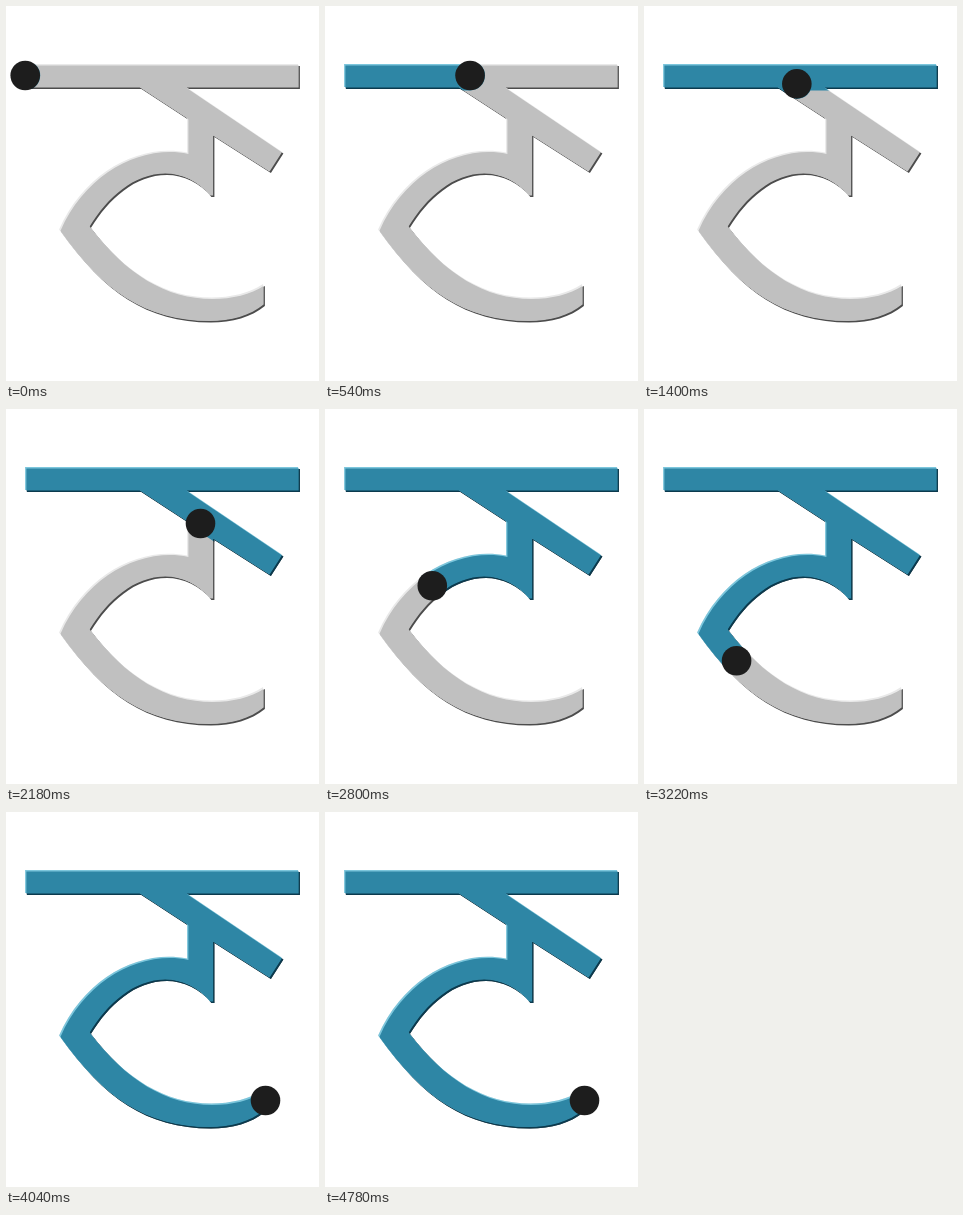
Write an HTML page that moves like this. It is 313 by 375 pixels and loops after 4.8 s.

```html
<!DOCTYPE html>
<html lang="en">
<head>
<meta charset="utf-8">
<title>Letter stroke order</title>
<style>
  html, body { margin: 0; width: 100%; height: 100%; overflow: hidden; background: #fff; }
  svg { display: block; width: 100vw; height: 100vh; }
</style>
</head>
<body>
<svg viewBox="0 0 313 375">
  <defs>
    <path id="glyph" d="M20 59H293V82H181L276.5 146.500 264 166 207.500 130V190H204.500
      C194 176 176 168 160 168C128 168 102 192 84 221C120 268 160 292.500 206 292.500
      C226 292.500 244 288 258 279V299C245 310 225 315.500 204 315.500
      C140 315.500 97 285 54 224.500C80 166 135 138 182 147.500V113L134.500 82H20Z"/>
    <clipPath id="inset"><use href="#glyph" x=".4" y=".4"/></clipPath>
    <mask id="drawn" maskUnits="userSpaceOnUse" x="0" y="0" width="313" height="375">
      <g fill="none" stroke="#fff" stroke-miterlimit="8">
        <path class="stroke" stroke-width="30" stroke-linecap="round" d="M19 69.500H289.500"/>
        <path class="stroke" stroke-width="30" stroke-linecap="round" d="M141 70L270.500 156"/>
        <path class="stroke" stroke-width="34" d="M194.500 105V166C168 148 105 155 69 222
          C102 272 152 305 205 305C226 305 244 299 259.500 288.500"/>
      </g>
    </mask>
  </defs>
  <g>
    <use href="#glyph" x=".9" y=".9" fill="#4c4c4c"/>
    <use href="#glyph" x="-.9" y="-.9" fill="#e9e9e9"/>
    <g clip-path="url(#inset)"><use href="#glyph" x="-.4" y="-.4" fill="#c0c0c0"/></g>
  </g>
  <g mask="url(#drawn)">
    <use href="#glyph" x=".9" y=".9" fill="#0b3a4e"/>
    <use href="#glyph" x="-.9" y="-.9" fill="#7cc6dc"/>
    <g clip-path="url(#inset)"><use href="#glyph" x="-.4" y="-.4" fill="#2e86a5"/></g>
  </g>
  <circle id="pen" r="14.800" fill="#1d1d1d"/>
</svg>
<script>
const LOOP = 4800, SPEED = 0.233;
const starts = [0, 1340, 2140];
const pen = document.getElementById('pen');
const strokes = [...document.querySelectorAll('.stroke')].map((path, i) => {
  const length = path.getTotalLength();
  return { path, length, start: starts[i], end: starts[i] + length / SPEED };
});

function penAt(t) {
  const i = strokes.findLastIndex(s => t >= s.start);
  const { path, length, start, end } = strokes[i];
  const p = path.getPointAtLength(Math.min(length, (t - start) * SPEED));
  const next = strokes[i + 1];
  if (t <= end || !next) return p;
  // Lifted pen travels to the next stroke
  const q = next.path.getPointAtLength(0);
  const k = (t - end) / (next.start - end);
  return { x: p.x + (q.x - p.x) * k, y: p.y + (q.y - p.y) * k };
}

function render(t) {
  for (const { path, length, start } of strokes) {
    const done = Math.max(0, Math.min(length, (t - start) * SPEED));
    path.setAttribute('stroke-dasharray', `${done} ${length + 50}`);
    path.setAttribute('stroke-opacity', done > 0 ? 1 : 0);
  }
  const { x, y } = penAt(t);
  pen.setAttribute('cx', x);
  pen.setAttribute('cy', y);
}

const origin = performance.now();
function tick() {
  render((performance.now() - origin) % LOOP);
  requestAnimationFrame(tick);
}
tick();
</script>
</body>
</html>
```
